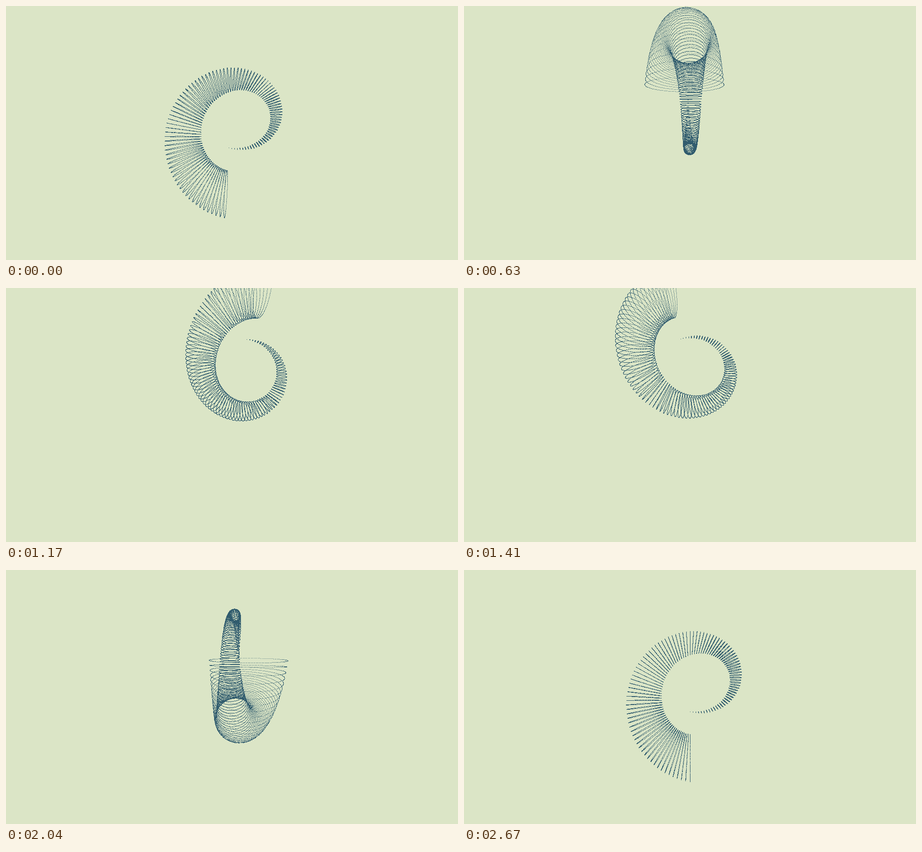
Recreate the animation shown at these times as an HTML page with a canvas. Size 960 by 540 pixels, loop 2.7 s.

```html
<!DOCTYPE html>
<html lang="en">
<head>
<meta charset="utf-8">
<title>Turning horn</title>
<style>
  html, body { margin: 0; width: 100%; height: 100%; overflow: hidden; background: #dbe5c6; }
  canvas { display: block; }
</style>
</head>
<body>
<canvas id="stage" width="960" height="540"></canvas>
<script>
const ctx = document.getElementById("stage").getContext("2d");
const W = 960, H = 540, TAU = Math.PI * 2;
const PAPER = "#dbe5c6", INK = "#315c6e";
const STEP = 30, STEPS = 90;        // ms per pose, poses per loop
const RINGS = 100, DOTS = 180;
const R = 97;                       // bend radius; also the drift over one turn
const LIFT = -65.4;                 // height of the pivot
const CAMERA = H / 2 / Math.tan(Math.PI / 6);

// A horn of dotted rings that widens and drifts along one full turn.
const points = [];
for (let i = 0; i <= RINGS; i++) {
  const u = i / RINGS, bend = u * TAU, r = u * R / 2;
  for (let j = 0; j < DOTS; j++) {
    const phi = j / DOTS * TAU;
    const reach = R + r * Math.cos(phi);
    points.push([
      reach * Math.sin(bend),
      reach * Math.cos(bend) + u * R,
      r * Math.sin(phi)
    ]);
  }
}

function draw(ms) {
  const pose = Math.floor(ms / STEP + 1e-4) % STEPS + 1;
  const a = pose / STEPS * TAU, c = Math.cos(a), s = Math.sin(a);
  ctx.fillStyle = PAPER;
  ctx.fillRect(0, 0, W, H);
  ctx.fillStyle = INK;
  for (const [x, y, z] of points) {
    // turn about z, then about y, then project
    const tx = x * c - y * s;
    const ty = x * s + y * c + LIFT;
    const scale = CAMERA / (CAMERA + tx * s - z * c);
    const px = W / 2 + (tx * c + z * s) * scale;
    const py = H / 2 + ty * scale;
    ctx.fillRect(Math.floor(px), Math.floor(py), 1, 1);
  }
}

function loop(now) {
  draw(Math.max(0, now));
  requestAnimationFrame(loop);
}
draw(0);
requestAnimationFrame(loop);
</script>
</body>
</html>
```
